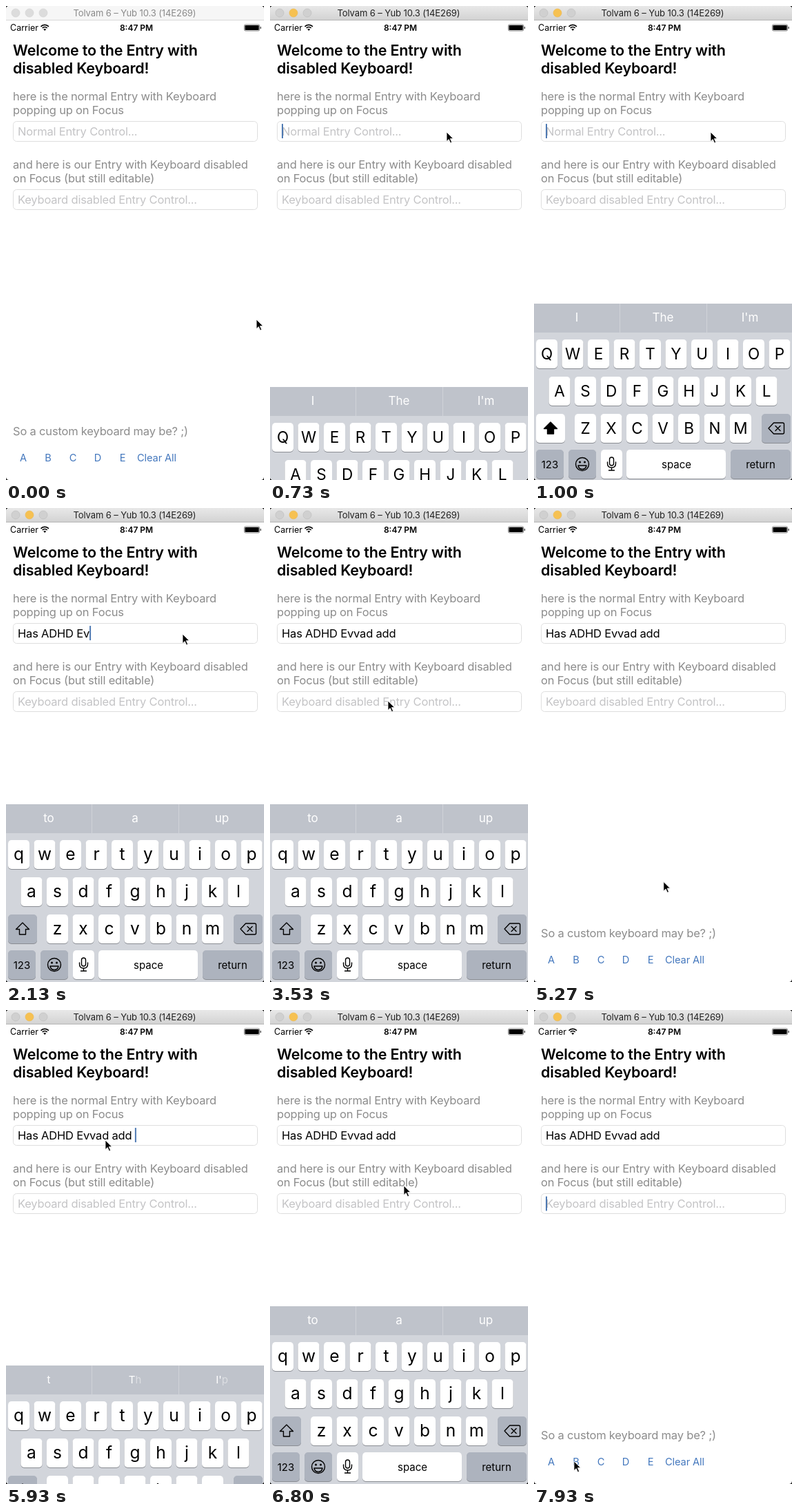
These frames come from a looping animation (374x688 px, 8 s). An HTML page:

```html
<!DOCTYPE html>
<html lang="en">
<head>
<meta charset="utf-8">
<title>Entry with disabled keyboard</title>
<style>
  html, body { margin: 0; width: 100%; height: 100%; overflow: hidden; background: #222; }
  svg { display: block; width: 100vw; height: 100vh; }
  text { font-family: Inter, Roboto, sans-serif; white-space: pre; }
  .body { font-size: 16.5px; letter-spacing: -.19px; fill: #8c8c8c; }
  .body.hint { fill: #c4c4c6; }
  .body.typed { fill: #000; }
  .head { font-size: 21.5px; font-weight: 600; letter-spacing: -.18px; }
  .bar { font-size: 13px; letter-spacing: -.1px; }
  .link { font-size: 14.6px; letter-spacing: -.1px; fill: #4377bd; }
  .mid { text-anchor: middle; }
  .word { fill: #fff; font-size: 17px; }
  .small { font-size: 15px; }
  .upper { font-size: 22.5px; }
  .lower { font-size: 24.5px; }
  .line { fill: none; stroke: #000; stroke-width: 1.4; stroke-linejoin: round; stroke-linecap: round; }
</style>
</head>
<body>
<svg id="stage" viewBox="0 0 374 688"></svg>
<script>
const LOOP = 8000;
const KEYBOARD_HEIGHT = 258;
const MESSAGE = 'Has ADHD Evvad add ';
const TYPE_START = 1267, TYPE_STEP = 84;
const SHOW_1 = 635, HIDE_1 = 3600, SHOW_2 = 5806, HIDE_2 = 7000;

// Pointer tip: time, x, y
const POINTER = [
  [0, 363, 455], [70, 363, 455], [560, 256, 183], [2900, 256, 183],
  [3450, 171, 280], [3650, 171, 280], [4200, 121, 463], [4750, 110, 640],
  [5200, 190, 560], [5740, 144, 189], [6200, 144, 189], [6800, 194, 255],
  [6930, 172, 281], [7150, 172, 281], [7800, 90, 640], [7930, 58, 655], [LOOP, 58, 655]
];

const text = (x, y, cls, str, extra = '') =>
  `<text x="${x}" y="${y}" class="${cls}" ${extra}>${str}</text>`;
const rect = (x, y, w, h, fill, r = 0, extra = '') =>
  `<rect x="${x}" y="${y}" width="${w}" height="${h}" rx="${r}" fill="${fill}" ${extra}/>`;
const light = (x, id) => `<circle id="${id}" cx="${x}" cy="10" r="6" stroke-width=".6"/>`;
const field = y => rect(10.5, y + .5, 354, 29, '#fff', 5, 'stroke="#dedede"');

const LIGHT_KEY = '#fff', DARK_KEY = '#adb3be';
const key = (x, y, w, fill, id = '') =>
  rect(x, y + 1, w, 42, '#8a8d93', 5) + rect(x, y, w, 42, fill, 5, id && `id="${id}"`);

const letterRow = (letters, first, y) => [...letters].map((letter, i) => {
  const center = first + i * 37.5;
  return key(center - 15.5, y, 31, LIGHT_KEY) +
    text(center, y + 29, 'mid letter', letter);
}).join('');

function keyboard() {
  return rect(0, 430, 374, 43, '#bfc3cb') + rect(0, 472, 374, 480, '#d2d5db') +
    rect(124, 430, 1, 42, '#d0d3d9') + rect(250, 430, 1, 42, '#d0d3d9') +
    [62, 187, 313].map(x => text(x, 456, 'word mid', '')).join('') +
    letterRow('qwertyuiop', 18.5, 482) +
    letterRow('asdfghjkl', 37, 536) +
    letterRow('zxcvbnm', 74.5, 590) +
    key(3, 590, 42, DARK_KEY, 'shiftKey') +
    '<path id="shiftArrow" class="line" d="M24 602l9.5 9.5h-5v7.500h-9v-7.500h-5z"/>' +
    key(330, 590, 42, DARK_KEY) +
    '<path class="line" d="M347.500 603h13q2 0 2 2v12q0 2-2 2h-13l-7.500-8zM350 607.500l7 7m0-7l-7 7"/>' +
    key(3, 642, 40, DARK_KEY) + text(23, 668.5, 'mid small', '123') +
    key(50, 642, 40, DARK_KEY) +
    '<circle cx="70" cy="663" r="9.500" class="line"/>' +
    '<path class="line" d="M64 665h12q-1 5.500-6 5.500t-6-5.500z"/>' +
    '<circle cx="66.500" cy="660" r="1.500"/><circle cx="73.500" cy="660" r="1.500"/>' +
    key(97, 642, 31, LIGHT_KEY) +
    '<rect x="109.500" y="653" width="6" height="12" rx="3" class="line"/>' +
    '<path class="line" d="M106.500 660v2q0 6 6 6t6-6v-2M112.500 668v4m-4 0h8"/>' +
    key(134, 642, 144, LIGHT_KEY) + text(206.5, 668.5, 'mid small', 'space') +
    key(285, 642, 87, DARK_KEY) + text(328.5, 668.5, 'mid small', 'return');
}

const stage = document.getElementById('stage');
stage.innerHTML = `
  <defs>
    <linearGradient id="active" x2="0" y2="1">
      <stop stop-color="#e8e8e8"/><stop offset="1" stop-color="#d3d3d3"/>
    </linearGradient>
    <clipPath id="window"><rect width="374" height="688" rx="4.500"/></clipPath>
  </defs>
  <g clip-path="url(#window)">
    ${rect(0, 0, 374, 688, '#fff')}
    ${rect(0, 0, 374, 20, '#f6f6f6', 0, 'id="titleBar"')}
    <rect id="titleEdge" y="20" width="374" height="1"/>
    ${light(14, 'closeLight')}${light(34, 'miniLight')}${light(54, 'zoomLight')}
    ${text(186.5, 15, 'bar mid', 'Tolvam 6 – Yub 10.3 (14E269)', 'id="titleText"')}

    ${text(6, 35.5, '', 'Carrier', 'font-size="12.500"')}
    <g fill="none" stroke="#000" stroke-width="1.700">
      <path d="M50.500 29.800a8 8 0 0 1 11.400 0M52.700 32a5 5 0 0 1 7 0"/>
    </g>
    <path d="M56.200 36l-2-2.200a3 3 0 0 1 4 0z"/>
    ${text(189, 35.5, 'mid', '8:47 PM', 'font-size="12" font-weight="600"')}
    ${rect(345.4, 26.9, 22.2, 9.2, 'none', 2, 'stroke="#666" stroke-width=".8"')}
    ${rect(346.4, 27.9, 20.2, 7.2, '#000', 1)}${rect(368.5, 30, 1.3, 3.2, '#444', .6)}

    ${text(10, 72, 'head', 'Welcome to the Entry with')}
    ${text(10, 98, 'head', 'disabled Keyboard!')}
    ${text(10, 136.5, 'body', 'here is the normal Entry with Keyboard')}
    ${text(10, 156.5, 'body', 'popping up on Focus')}
    ${field(167)}
    ${text(17, 187.5, 'body hint', 'Normal Entry Control...', 'id="hint"')}
    ${text(17, 187.5, 'body typed', '', 'id="typed"')}
    ${text(10, 236, 'body', 'and here is our Entry with Keyboard disabled')}
    ${text(10, 256, 'body', 'on Focus (but still editable)')}
    ${field(266)}
    ${text(17, 287, 'body hint', 'Keyboard disabled Entry Control...')}
    ${rect(0, 0, 2, 21, '#4f7ab3', .5, 'id="caret"')}

    ${text(10, 622.5, 'body', 'So a custom keyboard may be? ;)')}
    ${[...'ABCDE'].map((c, i) => text(25 + 36 * i, 661, 'link mid', c)).join('')}
    ${text(190, 661, 'link', 'Clear All')}

    <g id="keyboard">${keyboard()}</g>
    <path id="pointer" d="M0 0v13.500l3.200-3 2.300 5.200 2.100-.9-2.300-5.200h4.300z"
      stroke="#fff" stroke-width=".8"/>
  </g>`;

const el = id => document.getElementById(id);
const letters = [...stage.querySelectorAll('.letter')].map(node => [node, node.textContent]);
const words = [...stage.querySelectorAll('.word')];

const FIRST_WORDS = ['I', 'The', "I'm"];
const NEXT_WORDS = ['to', 'a', 'up'];
const faint = s => `<tspan opacity=".45">${s}</tspan>`;
const MIXED_WORDS = ['t', 'T' + faint('h'), "I'" + faint('p')];

// Share of the distance left in a critically damped spring.
function remaining(age) {
  const x = Math.max(0, age) * .01826;
  return (1 + x) * Math.exp(-x);
}

function keyboardOffset(t) {
  const share =
    t < HIDE_1 ? remaining(t - SHOW_1) :
    t < SHOW_2 ? 1 - remaining(t - HIDE_1) :
    t < HIDE_2 ? remaining(t - SHOW_2) : 1 - remaining(t - HIDE_2);
  return Math.round(KEYBOARD_HEIGHT * share);
}

function blink(age) {
  const a = age % 950;
  if (a < 450) return 1;
  if (a < 620) return 1 - (a - 450) / 170;
  return a < 830 ? 0 : (a - 830) / 120;
}

function pointerAt(t) {
  const i = POINTER.findIndex(p => p[0] > t);
  const [t0, x0, y0] = POINTER[i - 1], [t1, x1, y1] = POINTER[i];
  const u = (t - t0) / (t1 - t0), e = u * u * (3 - 2 * u);
  return [x0 + (x1 - x0) * e, y0 + (y1 - y0) * e];
}

function drawTitleBar(active) {
  el('titleBar').setAttribute('fill', active ? 'url(#active)' : '#f6f6f6');
  el('titleEdge').setAttribute('fill', active ? '#b5b5b5' : '#d8d8d8');
  el('titleText').setAttribute('fill', active ? '#222' : '#8a8a8a');
  for (const id of ['closeLight', 'miniLight', 'zoomLight']) {
    const yellow = active && id === 'miniLight';
    el(id).setAttribute('fill', yellow ? '#f6c152' : active ? '#d0d0d0' : '#dcdcdc');
    el(id).setAttribute('stroke', yellow ? '#eab84f' : active ? '#bababa' : '#d0d0d0');
  }
}

function drawCaret(t, typedCount) {
  const lastKey = TYPE_START + (MESSAGE.length - 1) * TYPE_STEP;
  const second = (t >= 3620 && t < SHOW_2) || t >= 6960;
  const typing = t >= TYPE_START && t < lastKey;
  const start = [SHOW_1 - 35, lastKey, 3620, SHOW_2, 6100, 6960].filter(s => s <= t).pop();
  const caret = el('caret');
  caret.setAttribute('x', second || !typedCount ? 17 : 17 + el('typed').getComputedTextLength());
  caret.setAttribute('y', second ? 270.5 : 171);
  caret.setAttribute('opacity', start === undefined ? 0 : typing ? 1 : blink(t - start));
}

function drawKeyboard(t) {
  const offset = keyboardOffset(t), upper = t < TYPE_START;
  const board = el('keyboard');
  board.setAttribute('transform', `translate(0 ${offset})`);
  board.setAttribute('visibility', offset === KEYBOARD_HEIGHT ? 'hidden' : 'visible');
  for (const [node, letter] of letters) {
    node.textContent = upper ? letter.toUpperCase() : letter;
    node.setAttribute('class', 'mid letter ' + (upper ? 'upper' : 'lower'));
  }
  el('shiftKey').setAttribute('fill', upper ? LIGHT_KEY : DARK_KEY);
  el('shiftArrow').style.fill = upper ? '#000' : 'none';

  const mixed = t >= 5890 && t < 6000;
  const set = mixed ? MIXED_WORDS :
    upper || (t >= SHOW_2 && t < 5890) ? FIRST_WORDS : NEXT_WORDS;
  words.forEach((node, i) => {
    node.innerHTML = set[i];
    node.style.fontSize = mixed ? '15px' : '17px';
  });
}

function draw(t) {
  const count = t < TYPE_START ? 0 :
    Math.min(MESSAGE.length, 1 + Math.floor((t - TYPE_START) / TYPE_STEP));
  el('typed').textContent = MESSAGE.slice(0, count);
  el('hint').setAttribute('visibility', count ? 'hidden' : 'visible');
  drawTitleBar(t >= 530);
  drawCaret(t, count);
  drawKeyboard(t);
  el('pointer').setAttribute('transform', `translate(${pointerAt(t)})`);
}

const begin = performance.now();
function tick() {
  draw((performance.now() - begin) % LOOP);
  requestAnimationFrame(tick);
}
tick();
</script>
</body>
</html>
```
